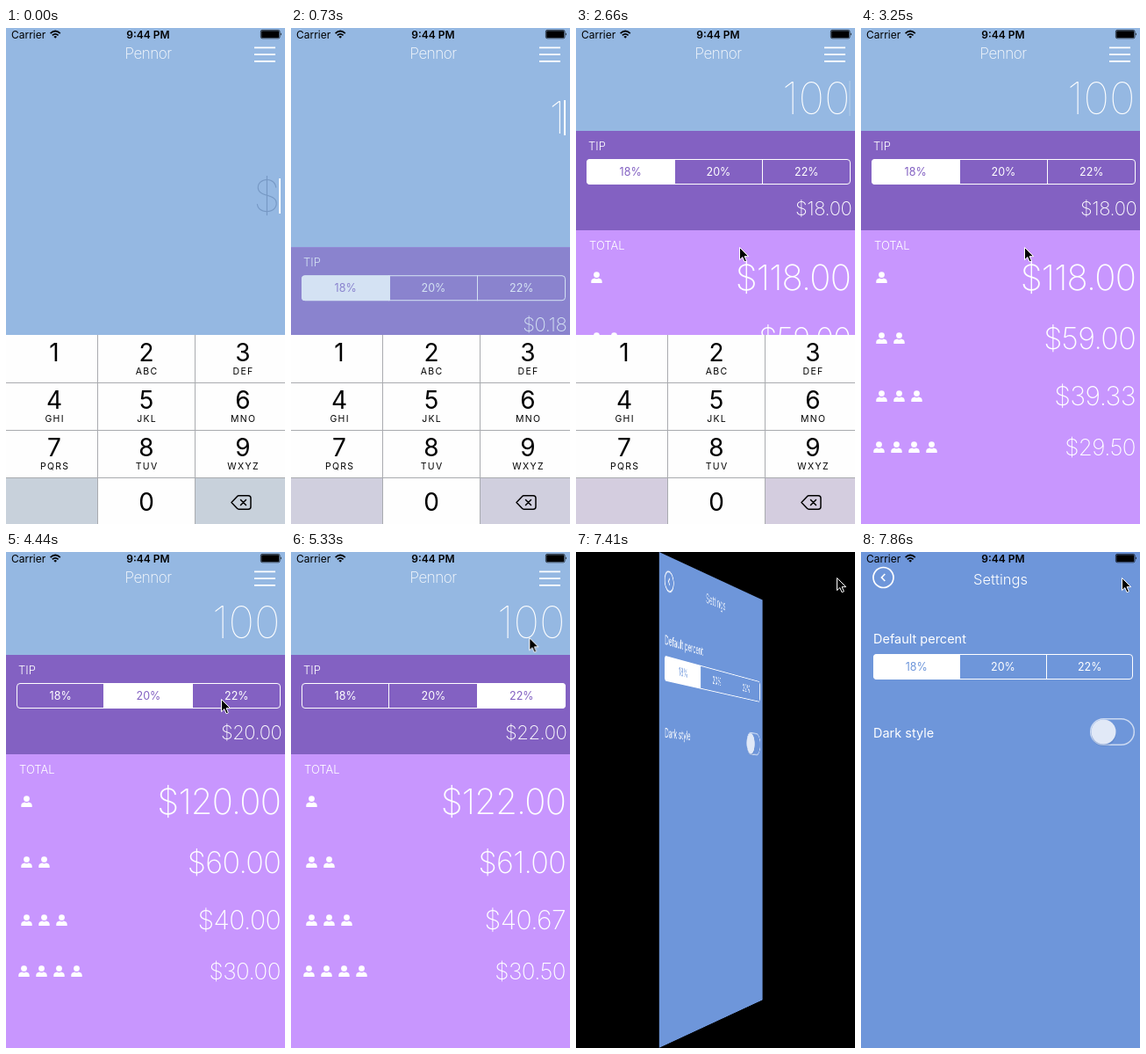
Recreate the animation shown at these times as an HTML page. Size 318 by 564 pixels, loop 8000 ms.

```html
<!DOCTYPE html>
<html lang="en">
<head>
<meta charset="utf-8">
<title>Tip calculator</title>
<style>
@property --turn { syntax: "<angle>"; inherits: false; initial-value: 0deg; }

html, body { margin: 0; width: 318px; height: 564px; overflow: hidden; background: #000; }
#stage {
  position: relative; width: 318px; height: 564px; overflow: hidden;
  perspective: 1219px; perspective-origin: 160px 282px;
}
svg { position: absolute; left: 0; top: 0; width: 320px; height: 564px; display: block; }
text { font-family: Inter, "Liberation Sans", sans-serif; dominant-baseline: central; }

/* The phone screen is slightly wider than the stage. */
#card {
  position: absolute; left: 0; top: 0; width: 320px; height: 564px; transform-style: preserve-3d;
  transform: translateZ(calc(160px * sin(var(--turn)))) rotateY(var(--turn));
}
.face { backface-visibility: hidden; overflow: hidden; }
#settings { transform: rotateY(180deg); }

.white { fill: #fff; }
.mid { text-anchor: middle; }
.end { text-anchor: end; }
.thin { font-weight: 200; letter-spacing: -.02em; }
.label { font-size: 13px; font-weight: 300; }
.row { font-size: 14.5px; }
.seg text { font-size: 12.5px; fill: #fff; text-anchor: middle; }
.seg text.on { fill: var(--ink); }
.digit { font-size: 28px; }
.letters { font-size: 10.5px; letter-spacing: 1.3px; }
.line { fill: none; stroke: #fff; }

/* Paused: the script below seeks every animation to the clock. */
#card, #bill, #caret, #panel, #keypad, #menu, #mouse, .soft { animation: 8s linear infinite paused; }
#card { animation-name: flip; }
#bill { animation-name: bill; }
#caret { animation-name: blink; }
#panel { animation-name: panel, appear; }
#keypad { animation-name: dismiss; }
#menu { animation-name: press; }
#mouse { animation-name: point, show; }
.soft { animation-name: tint; }

@keyframes flip {
  0%, 87.17% { --turn: 0deg; animation-timing-function: cubic-bezier(.42, 0, .58, 1); }
  96.54%, 100% { --turn: -180deg; }
}
@keyframes bill {
  0%, 7.45% { transform: translateY(111px); }
  9.26% { transform: translateY(22px); animation-timing-function: cubic-bezier(.1, .8, .3, 1); }
  12.96%, 100% { transform: translateY(0); }
}
@keyframes panel {
  0%, 7.45% { transform: translateY(660px); }
  9.26% { transform: translateY(132px); animation-timing-function: cubic-bezier(.1, .8, .3, 1); }
  12.96%, 100% { transform: translateY(0); }
}
@keyframes appear {
  0%, 7.45% { opacity: 0; }
  9.26% { opacity: .6; }
  11.1%, 100% { opacity: 1; }
}
@keyframes blink {
  0%, 18.6% { opacity: 1; }
  20.37% { opacity: .4; }
  22.2%, 24.2% { opacity: 0; }
  25.9%, 31.5% { opacity: 1; }
  33.3%, 35.3% { opacity: .15; }
  37%, 100% { opacity: 0; }
}
@keyframes tint {
  0%, 7.45% { fill: #c8d1db; }
  9.26% { fill: #d0cfde; }
  12.96%, 100% { fill: #d4cddf; }
}
@keyframes dismiss {
  0%, 36% { transform: translateY(0); animation-timing-function: ease-in-out; }
  40%, 100% { transform: translateY(216px); }
}
@keyframes press {
  0%, 85.1% { stroke: #fff; animation-timing-function: step-end; }
  85.15%, 100% { stroke: #98939a; }
}
@keyframes point {
  0%, 29.6% { transform: translate(163px, 337px); }
  33.3%, 40.7% { transform: translate(186px, 249px); animation-timing-function: ease-in-out; }
  48.1%, 51.85% { transform: translate(158px, 176px); }
  55.5%, 62.95% { transform: translate(245px, 167px); }
  70.3%, 100% { transform: translate(297px, 29px); }
}
@keyframes show {
  0% { visibility: hidden; animation-timing-function: step-end; }
  29.5%, 100% { visibility: visible; }
}
</style>
</head>
<body>
<div id="stage">
  <div id="card">
    <svg class="face" id="main" viewBox="0 0 320 564">
      <defs>
        <g id="person">
          <circle cy="-3.4" r="3.4"/>
          <path d="M-6.2 6V4.4C-6.2 1.6-4 .8-2.2.4Q0 2.2 2.2.4C4 .8 6.2 1.6 6.2 4.4V6Z"/>
        </g>
      </defs>
      <rect width="320" height="564" fill="#95b8e2"/>
      <text class="white mid" x="162" y="29" font-size="17" font-weight="200" letter-spacing="-.5">Pennor</text>
      <path id="menu" class="line" stroke-width="1.7" d="M283 22.3h24M283 30.1h24M283 37.9h24"/>
      <g id="bill">
        <text id="amount" class="end" x="312.5" y="80" font-size="50" font-weight="100"></text>
        <rect id="caret" class="white" x="311" y="60" width="2" height="40"/>
      </g>
      <g id="panel">
        <rect y="117" width="320" height="113" fill="#8361c2"/>
        <text class="white label" x="14" y="134">TIP</text>
        <g id="rates" class="seg" style="--ink:#8361c2"></g>
        <text id="tip" class="white thin end" x="314.4" y="204.5" font-size="22"></text>
        <rect y="230" width="320" height="334" fill="#c896fe"/>
        <text class="white label" x="15" y="247">TOTAL</text>
        <g id="shares" class="white"></g>
      </g>
      <g id="keypad">
        <rect y="349" width="320" height="215" fill="#fefefe"/>
        <path class="soft" d="M0 512h104v52H0ZM216 512h104v52H216Z"/>
        <path stroke="#a9abaf" d="M104.5 349v215M215.5 349v215M0 403.5h320M0 457.5h320M0 511.5h320"/>
        <g id="keys" class="mid"></g>
        <path fill="none" stroke="#000" stroke-width="1.5" stroke-linejoin="round" stroke-linecap="round"
          d="M257 539.5l6.2-6.6q1-1.1 2.4-1.1H276q3 0 3 3v9.4q0 3-3 3H265.6q-1.4 0-2.4-1.1ZM267.5 536.5l6 6M273.5 536.5l-6 6"/>
      </g>
    </svg>

    <svg class="face" id="settings" viewBox="0 0 320 564">
      <rect width="320" height="564" fill="#6e96da"/>
      <circle class="line" cx="25.5" cy="29" r="11.5" stroke-width="1.7"/>
      <path class="line" stroke-width="1.7" d="M27.3 25l-3.8 4 3.8 4"/>
      <text class="white mid" x="159" y="30.5" font-size="16.5" font-weight="300">Settings</text>
      <text class="white row" x="14" y="98">Default percent</text>
      <g id="defaults" class="seg" style="--ink:#6e96da"></g>
      <text class="white row" x="14" y="205">Dark style</text>
      <rect class="line" x="261.7" y="189.7" width="49.6" height="29.6" rx="14.8" stroke-width="1.5" opacity=".65"/>
      <circle cx="276.5" cy="207" r="14" fill="#3c5fa0" opacity=".22"/>
      <circle cx="276.5" cy="204.5" r="14" fill="#e1e9f7"/>
    </svg>
  </div>

  <svg viewBox="0 0 320 564">
    <text x="6" y="7.3" font-size="12">Carrier</text>
    <path fill="none" stroke="#000" stroke-width="1.7" d="M50.6 6.2q5.6-5.4 11.2 0M52.8 8.4q3.4-3.2 6.8 0"/>
    <path d="M54.4 9.9q1.8-1.6 3.6 0L56.2 11.8Z"/>
    <text class="mid" x="162" y="7.3" font-size="12" font-weight="600">9:44 PM</text>
    <rect x="290.4" y="2.4" width="21.6" height="9.4" rx="1.6" fill="none" stroke="#000" stroke-width=".7"/>
    <rect x="291.2" y="3.2" width="20" height="7.8" rx=".8"/>
    <path d="M313 5.3q1.8 1.7 0 3.4Z"/>
    <path id="mouse" stroke="#fff" stroke-linejoin="round" d="M.5.5v14.2l3.3-3.1 2.3 5.2 2.3-1-2.3-5.1h4.6Z"/>
  </svg>
</div>

<script>
const LOOP = 8000, STEPS = 54, TICK = LOOP / STEPS;
const RATES = [18, 20, 22];
const $ = id => document.getElementById(id);
const money = n => "$" + n.toFixed(2);

// Draws a three-way control and returns the function that selects a cell.
function segments(id, x, y, w) {
  const cell = w / 3;
  const edge = n => Math.floor(x + cell * n);
  $(id).innerHTML = `
    <clipPath id="${id}Clip"><rect x="${x}" y="${y}" width="${w}" height="29" rx="4"/></clipPath>
    <g clip-path="url(#${id}Clip)">
      <rect class="white pick" y="${y}" width="${Math.ceil(cell)}" height="29"/>
    </g>
    <rect class="line" x="${x + .5}" y="${y + .5}" width="${w - 1}" height="28" rx="3.5"/>
    <path class="line" d="M${edge(1) - .5} ${y}v29M${edge(2) + .5} ${y}v29"/>` +
    RATES.map((r, i) => `<text x="${x + cell * (i + .5)}" y="${y + 14.5}">${r}%</text>`).join("");
  const pick = $(id).querySelector(".pick");
  const labels = [...$(id).querySelectorAll("text")];
  return n => {
    pick.setAttribute("x", edge(n));
    labels.forEach((label, i) => label.classList.toggle("on", i === n));
  };
}

const pickRate = segments("rates", 12, 149, 301);
segments("defaults", 14, 116, 296)(0);

// One row per party size: y, font size, first icon x
const rows = [[284, 40, 23.5], [353, 34, 23.5], [419, 30, 23.5], [477, 26, 20.5]];
$("shares").innerHTML = rows.map(([y, size, x], n) =>
  Array.from({ length: n + 1 }, (_, i) => `<use href="#person" x="${x + 20 * i}" y="${y}"/>`).join("") +
  `<text class="thin end" x="313" y="${y - .8}" font-size="${size}"></text>`
).join("");
const shares = [...$("shares").querySelectorAll("text")];

const letters = ["", "ABC", "DEF", "GHI", "JKL", "MNO", "PQRS", "TUV", "WXYZ"];
const columns = [55, 160, 270];
$("keys").innerHTML = letters.map((s, i) => {
  const x = columns[i % 3], y = 369 + 54 * Math.floor(i / 3);
  return `<text class="digit" x="${x}" y="${y}">${i + 1}</text>
    <text class="letters" x="${x + .6}" y="${y + 21.5}">${s}</text>`;
}).join("") + `<text class="digit" x="160" y="538.5">0</text>`;

const motions = document.getAnimations();
const start = performance.now();

function draw() {
  const t = (performance.now() - start) % LOOP;
  const step = Math.min(STEPS - 1, Math.floor((t + 11) / TICK));
  for (const m of motions) m.currentTime = step * TICK;

  const typed = step < 3 ? "" : step < 14 ? "1" : step < 15 ? "10" : "100";
  const choice = step < 28 ? 0 : step < 34 ? 1 : 2;
  const bill = Number(typed), tip = bill * RATES[choice] / 100;
  $("amount").textContent = typed || "$";
  $("amount").setAttribute("fill", typed ? "#fff" : "#7698c4");
  $("tip").textContent = money(tip);
  shares.forEach((el, i) => el.textContent = money((bill + tip) / (i + 1)));
  pickRate(choice);
  requestAnimationFrame(draw);
}
draw();
</script>
</body>
</html>
```
